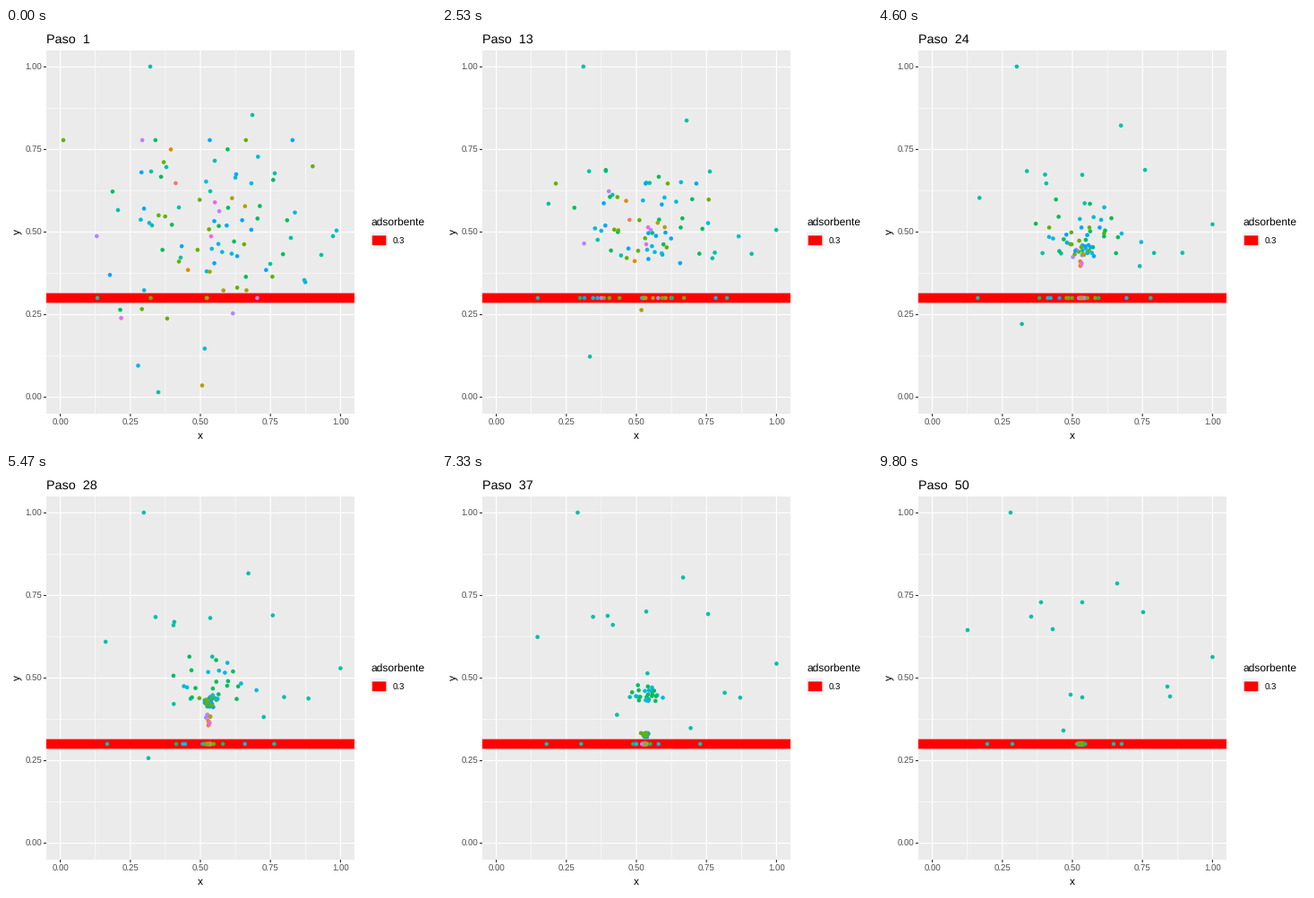
These frames come from a looping animation (480 by 466 pixels, 9.99 s). A matplotlib script:

```python
import numpy as np
import matplotlib.pyplot as plt
from matplotlib.animation import FuncAnimation
from matplotlib.patches import Rectangle

W, H, DPI = 480, 466, 64
PX = 72 / DPI                      # points per pixel
STEPS, LOOP = 50, 9990
LEFT, TOP, RIGHT, BOTTOM = 45, 25, 389, 430
LINE_Y, REACH = 301, 6             # adsorbing line and its capture distance
CENTRE_X = 227
T = np.arange(STEPS)
rng = np.random.default_rng(9)

plt.rcParams["font.family"] = ["Liberation Sans", "DejaVu Sans"]
plt.rcParams["text.hinting"] = "none"

# One hue per charge, from -5 to 5
HUES = ["#F8766D", "#DB8E00", "#AEA200", "#64B200", "#00BD5C", "#00C1A7",
        "#00BADE", "#00A6FF", "#B385FF", "#EF67EB", "#FF63B6"]

# Neutral particles drift from start to end: x0, y0, x1, y1
DRIFTERS = [
    (161, 43, 148, 43), (275, 97, 267, 122), (233, 148, 228, 249),
    (228, 182, 228, 143), (162, 160, 171, 159), (179, 155, 195, 173),
    (193, 200, 182, 143), (300, 162, 296, 154), (125, 203, 100, 174),
    (365, 232, 398, 204), (318, 234, 263, 301), (295, 263, 323, 237),
    (352, 253, 326, 248), (195, 256, 215, 246), (163, 220, 207, 286),
    (170, 406, 150, 244), (102, 301, 122, 301), (333, 281, 272, 345),
]


def stick(x, y):
    """Hold a particle on the line from the step it first touches it."""
    gap = y - LINE_Y
    hit = (np.abs(gap) <= REACH) | (gap * gap[0] < 0)
    y = np.where(np.logical_or.accumulate(hit), LINE_Y, y)
    return np.column_stack([np.clip(x, 60.5, 373.4), y])


def drift(x0, y0, x1, y1):
    u = T / (STEPS - 1)
    return stick(x0 + (x1 - x0) * u, y0 + (y1 - y0) * u)


def fall(charge, x0, y0):
    """Gather at the centre, sooner for a stronger charge, then sink."""
    span = 16 + 24 / abs(charge)
    u = np.minimum(T / span, 1)
    p = .97 * (.88 * u + .12 * u ** 2)
    x = x0 + (CENTRE_X - x0) * p
    if y0 > LINE_Y:
        return stick(x, y0 - 7.0 * T)
    if y0 > 270:
        goal = 420
    else:
        goal = 250 + 58 * np.clip((T - .88 * span) / 15, 0, 1)
    return stick(x, y0 + (goal - y0) * p)


paths = [drift(*d) for d in DRIFTERS]
colors = [HUES[5]] * len(DRIFTERS)
for _ in range(82):
    size = min(1 + int(abs(rng.normal(0, 1.7))), 5)
    charge = size * rng.choice([-1, 1])
    x0 = np.clip(rng.normal(222, 64), 64, 369)
    y0 = np.clip(rng.normal(232, 66), 125, 405)
    paths.append(fall(charge, x0, y0))
    colors.append(HUES[charge + 5])
paths = np.array(paths)

fig = plt.figure(figsize=(W / DPI, H / DPI), dpi=DPI, facecolor="white")
ax = fig.add_axes([0, 0, 1, 1])
ax.set(xlim=(0, W), ylim=(H, 0))
ax.axis("off")


def sx(v):
    return 60.6 + 312.8 * v


def sy(v):
    return 411.6 - 368.2 * v


def box(x, y, w, h, color, z=0):
    ax.add_patch(Rectangle((x, y), w, h, fc=color, lw=0, zorder=z,
                           snap=False))


def line(xs, ys, color="white", width=1.15):
    ax.plot(xs, ys, color=color, lw=width * PX, solid_capstyle="butt",
            zorder=1, snap=False)


def label(x, y, s, size, color="black", **kw):
    return ax.text(x, y, s, fontsize=size * PX, color=color, **kw)


box(LEFT, TOP, RIGHT - LEFT, BOTTOM - TOP, "#EBEBEB")
for k in range(9):
    v = k / 8
    width = .6 if k % 2 else 1.15
    line([sx(v)] * 2, [TOP, BOTTOM], width=width)
    line([LEFT, RIGHT], [sy(v)] * 2, width=width)
    if k % 2 == 0:
        line([sx(v)] * 2, [BOTTOM, BOTTOM + 3], "#333333")
        line([LEFT - 3, LEFT], [sy(v)] * 2, "#333333")
        label(sx(v), 443, f"{v:.2f}", 9.6, "#4D4D4D", ha="center")
        label(40, sy(v) + 3.5, f"{v:.2f}", 9.6, "#4D4D4D", ha="right")
label(217, 458, "x", 12, ha="center")
label(12, 227.5, "y", 12, ha="center", va="center", rotation=90)
box(LEFT, 295.6, RIGHT - LEFT, 10.8, "red", 2)

label(407, 220, "adsorbente", 12)
box(407, 227.5, 19, 19, "#F2F2F2")
box(408.8, 231.4, 15.5, 10.8, "red", 2)
label(431.7, 240.5, "0.3", 9.6)

title = label(45, 17, "Paso  1", 14.4)
dots = ax.scatter(paths[:, 0, 0], paths[:, 0, 1], s=(4.6 * PX) ** 2,
                  c=colors, linewidths=0, zorder=3)


def update(i):
    title.set_text(f"Paso  {i + 1}")
    dots.set_offsets(paths[:, i])
    return title, dots


anim = FuncAnimation(fig, update, frames=STEPS, interval=LOOP / STEPS,
                     repeat=True, repeat_delay=0, blit=False)
plt.show()
```
